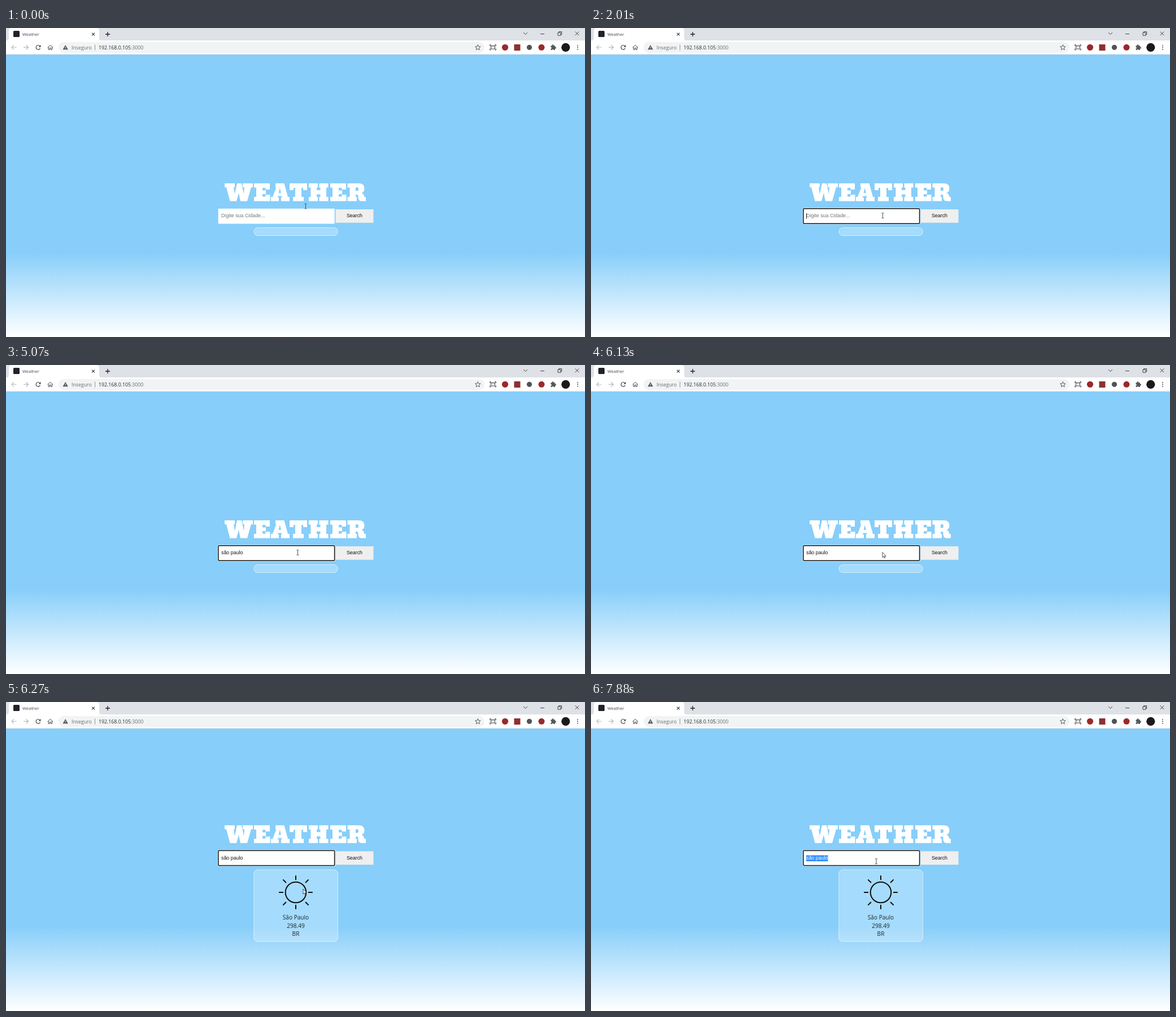
Write an HTML page with a canvas that moves like this. It is 1025 px wide and 547 px high and loops after 8 s.

```html
<!DOCTYPE html>
<html lang="pt">
<head>
<meta charset="utf-8">
<title>Weather</title>
<style>
  html, body { margin: 0; width: 100%; height: 100%; overflow: hidden; background: #fff; }
  canvas { display: block; }
</style>
</head>
<body>
<canvas id="stage" width="1025" height="547" role="img" aria-label="WEATHER"></canvas>
<script>
const ctx = document.getElementById('stage').getContext('2d');
const LOOP = 8000;
const UI = '"Open Sans", "Noto Sans", sans-serif';
const FORM = '8.89px "Liberation Sans", Arial, sans-serif';
const INK = '#45484c';

// Slab capitals, cap height 31.5
const SLAB = {
  W: 'M0 0H18V7H16L18 19L22 0H30L34 19L35 7H32V0H50V7H47L40 31.5H28L25 17L21 31.5H9.5L3 7H0Z',
  E: 'M0 0H28V11H20.5V8H15V12.5H21V19H15V23.5H20.5V20H28.5V31.5H0V24H4V7.5H0Z',
  A: 'M8 0H23.5L30 24H33V31.5H18V25H19.5L19 22.5H12.5L12 25H14V31.5H0V24H3L9.5 7H8ZM15.8 8L13.6 17H18Z',
  T: 'M0 0H31V12H24V8H21V24H25V31.5H6V24H10V8H7V12H0Z',
  H: 'M0 0H16V7.5H14V12H20.5V7.5H18.5V0H34.5V7.5H31V24H34.5V31.5H18.5V24H20.5V19.5H14V24H16V31.5H0V24H3.5V7.5H0Z',
  R: 'M0 0H20Q30 0 30 9Q30 15 25 17Q29.5 18.5 29.5 24H32.5V31.5H25Q19 31.5 19 24V22Q19 20 17 20H14.5V24H16.5V31.5H0V24H4V7.5H0ZM14.5 7V13.5H17Q19.5 13.5 19.5 10Q19.5 7 17 7Z'
};
for (const k in SLAB) SLAB[k] = new Path2D(SLAB[k]);
const TITLE_X = [387, 439, 469, 502, 536, 574, 604.5];
const ARROW = new Path2D('M0 0V9L2.1 7.2L3.5 10.2L4.8 9.6L3.4 6.7H6.2Z');

// Time at which each character of the query appears
const QUERY = 'são paulo';
const KEYS = [2340, 2810, 3090, 3260, 3720, 3860, 4250, 4320, 4520];

// [time, x, y] of the pointer hot spot
const MOUSE = [
  [0, 530.5, 315.5], [1000, 528, 318], [1070, 523, 324], [1140, 518, 330], [1210, 516.5, 332],
  [6130, 516, 331.5], [6270, 526, 331], [6340, 535, 321], [6410, 541, 311], [6480, 542, 308],
  [6610, 538, 305], [6670, 527, 300], [6740, 514, 293], [6800, 509, 286], [6870, 507, 283],
  [6950, 506, 281], [7280, 504.5, 281.5], [7880, 505, 282]
];

function fillRect(color, x, y, w, h) {
  ctx.fillStyle = color;
  ctx.fillRect(x, y, w, h);
}

function box(x, y, w, h, r, fill, stroke, width = 1) {
  ctx.beginPath();
  ctx.roundRect(x, y, w, h, r);
  if (fill) { ctx.fillStyle = fill; ctx.fill(); }
  if (stroke) { ctx.strokeStyle = stroke; ctx.lineWidth = width; ctx.stroke(); }
}

function disc(color, x, y, r) {
  ctx.fillStyle = color;
  ctx.beginPath();
  ctx.arc(x, y, r, 0, 7);
  ctx.fill();
}

function path(d, x, y, stroke, width = 1, fill) {
  const p = d instanceof Path2D ? d : new Path2D(d);
  ctx.save();
  ctx.translate(x, y);
  if (fill) { ctx.fillStyle = fill; ctx.fill(p, 'evenodd'); }
  if (stroke) { ctx.strokeStyle = stroke; ctx.lineWidth = width; ctx.stroke(p); }
  ctx.restore();
}

function text(s, x, y, font, color, align = 'left') {
  ctx.font = font;
  ctx.fillStyle = color;
  ctx.textAlign = align;
  ctx.fillText(s, x, y);
}

function star(x, y, r) {
  ctx.beginPath();
  for (let i = 0; i < 10; i++) {
    const a = i * Math.PI / 5 - Math.PI / 2, d = i % 2 ? r * 0.45 : r;
    ctx.lineTo(x + d * Math.cos(a), y + d * Math.sin(a));
  }
  ctx.closePath();
  ctx.strokeStyle = INK;
  ctx.lineWidth = 0.9;
  ctx.stroke();
}

function tabs() {
  fillRect('#dee1e6', 0, 0, 1025, 22.5);
  path('M0 22.5Q5 22.5 5 17.5V5Q5 0 10 0H160Q165 0 165 5V17.5Q165 22.5 170 22.5Z', 0, 0, null, 0, '#fff');
  box(13, 5, 11, 11, 1.5, '#20232a');
  text('Weather', 29, 13.6, '7.5px ' + UI, '#45484c');
  path('M-2.4 -2.4L2.4 2.4M2.4 -2.4L-2.4 2.4', 154.5, 11, '#303236', 1.1);
  path('M-4 0H4M0 -4V4', 180, 11, '#202124', 1.3);
  path('M-3.5 -1.7L0 1.7L3.5 -1.7', 919.5, 9.7, '#333', 0.9);
  path('M0 0H7', 946, 10.5, '#333', 0.9);
  path('M0 2H5V7H0ZM1.7 2V.3H6.7V5.3H5', 977, 6.2, '#333', 0.9);
  path('M-3.3 -3.3L3.3 3.3M3.3 -3.3L-3.3 3.3', 1011, 9.7, '#333', 0.9);
}

function toolbar() {
  fillRect('#fff', 0, 22, 1025, 25);
  fillRect('#e6e9ec', 0, 46, 1025, 1);
  const arrow = 'M4.5 0H-4M0 -4L-4 0L0 4';
  path(arrow, 14, 34.3, '#b4b7bb', 1.1);
  ctx.save();
  ctx.translate(35.5, 34.3);
  ctx.scale(-1, 1);
  path(arrow, 0, 0, '#a9adb1', 1.1);
  ctx.restore();
  ctx.beginPath();
  ctx.arc(57, 34.3, 3.8, 0.4, 5.5);
  ctx.strokeStyle = INK;
  ctx.lineWidth = 1.2;
  ctx.stroke();
  path('M4.5 -4.5V-.5H.5Z', 57, 34.3, null, 0, INK);
  path('M-4.6 .3L0 -4L4.6 .3M-3.2 -.8V4H-1V1H1V4H3.2V-.8', 78.3, 34.3, INK, 1);

  box(93, 25, 754, 19, 9.5, '#f1f3f4');
  path('M0 -4.2L4.7 4H-4.7ZM-.5 -1.2V1.2H.5V-1.2ZM-.5 2V3H.5V2Z', 105.2, 34.2, null, 0, '#55595e');
  const font = '8.75px ' + UI;
  text('Inseguro', 116, 37.7, font, '#6a6e73');
  fillRect('#888c90', 157, 29.5, 0.9, 10);
  text('192.168.0.105', 164, 37.7, font, '#2b2d30');
  text(':3000', 164 + ctx.measureText('192.168.0.105').width, 37.7, font, '#6a6e73');
  star(835.3, 34.6, 5);

  path('M-5.2 -2V-4.4H-3M3 -4.4H5.2V-2M5.2 2V4.4H3M-3 4.4H-5.2V2', 862, 34.3, INK, 1.1);
  box(858.6, 31.6, 6.8, 5.4, 0.5, null, INK, 1.1);
  disc('#9b2929', 883.5, 34.3, 5.6);
  fillRect('#8f3030', 899.5, 29, 11, 11);
  disc('#505357', 926.5, 34.3, 4.6);
  disc('#9b2929', 948, 34.3, 5.5);
  box(964.5, 31.2, 7.6, 7.8, 1, '#55595e');
  disc('#55595e', 968, 30.8, 1.6);
  disc('#55595e', 972.4, 35, 1.6);
  disc('#fff', 964.5, 35.2, 1.3);
  disc('#fff', 968.2, 39, 1.3);
  disc('#1d1819', 990.8, 34.3, 7.6);
  for (let i = -1; i < 2; i++) disc(INK, 1012, 34.3 + i * 3.4, 0.95);
}

function page() {
  const sky = ctx.createLinearGradient(0, 397, 0, 547);
  sky.addColorStop(0, '#87cefa');
  sky.addColorStop(1, '#fff');
  fillRect(sky, 0, 47, 1025, 500);
}

function caretOn(t) {
  if (t < 1480 || t >= 7550) return false;
  let last = t >= 7280 ? 7280 : 1480;
  if (t < 7280) for (const k of KEYS) if (t >= k) last = k;
  return Math.floor((t - last) / 535) % 2 === 0;
}

function field(t, dy) {
  const focus = t >= 1480, y = 319 - dy;
  box(583.5, y + 2, 67, 23.7, 0, '#efefef');
  text('Search', 617, y + 16.4, FORM, '#111', 'center');
  if (focus) {
    box(374.5, y - 0.5, 208.5, 29, 2.5, '#fff');
    box(375.8, y + 0.8, 205.8, 26.4, 1.5, '#fff', '#101010', 1.5);
  } else {
    box(375.7, y + 0.7, 206, 26.7, 0, '#fff');
  }

  const x = 381, base = y + 16.4;
  const typed = QUERY.slice(0, KEYS.filter(k => t >= k).length);
  if (!typed) text('Digite sua Cidade...', x, base, FORM, '#757575');
  else text(typed, x, base, FORM, '#111');

  const width = s => { ctx.font = FORM; return ctx.measureText(s).width; };
  if (t >= 7550) {
    const from = t < 7680 ? 4 : 0;
    const sx = x + width(QUERY.slice(0, from));
    fillRect('#3390ff', sx, y + 9, x + width(QUERY) - sx, 10.7);
    text(QUERY.slice(from), sx, base, FORM, '#fff');
  }
  if (caretOn(t)) fillRect('#111', x + width(typed), y + 8.7, 0.8, 10.3);
}

function sun(x, y) {
  ctx.strokeStyle = '#0b0d0e';
  ctx.lineWidth = 2;
  ctx.lineCap = 'round';
  ctx.beginPath();
  ctx.arc(x, y, 18.3, 0, 7);
  ctx.stroke();
  ctx.beginPath();
  for (let i = 0; i < 8; i++) {
    const c = Math.cos(i * Math.PI / 4), s = Math.sin(i * Math.PI / 4);
    const r = i % 2 ? 25 : 22.8;
    ctx.moveTo(x + c * r, y + s * r);
    ctx.lineTo(x + c * (r + 6.3), y + s * (r + 6.3));
  }
  ctx.stroke();
  ctx.lineCap = 'butt';
}

function card(t) {
  const stage = t < 6230 ? 0 : t < 6270 ? 1 : 2;
  const top = [353.5, 324.5, 297][stage], bottom = [367.5, 396.5, 424][stage];
  box(438.8, top, 148.6, bottom - top, 7, 'rgba(255,255,255,.25)', 'rgba(255,255,255,.6)');
  if (stage) {
    ['São Paulo', '298.49', 'BR'].forEach((s, i) =>
      text(s, 513, bottom - 39 + i * 14.5, '10.1px ' + UI, '#212529', 'center'));
  }
  if (stage === 2) sun(513, 337);
}

function pointer(t) {
  let i = MOUSE.length - 1;
  while (MOUSE[i][0] > t) i--;
  const [, x, y] = MOUSE[i];
  if (t >= 6130 && t < 6800) {
    path(ARROW, x, y, '#222', 0.8, '#fff');
  } else {
    path('M-2 -4.5H-.6L0 -4L.6 -4.5H2M0 -4V4M-2 4.5H-.6L0 4L.6 4.5H2', x, y, '#3a3f44', 0.9);
  }
}

function draw(t) {
  const dy = t < 6230 ? 0 : t < 6270 ? 29 : 56.7;
  page();
  tabs();
  toolbar();
  [...'WEATHER'].forEach((c, i) => path(SLAB[c], TITLE_X[i], 275 - dy, null, 0, '#fff'));
  field(t, dy);
  card(t);
  pointer(t);
}

function tick() {
  draw(performance.now() % LOOP);
  requestAnimationFrame(tick);
}
tick();
</script>
</body>
</html>
```
